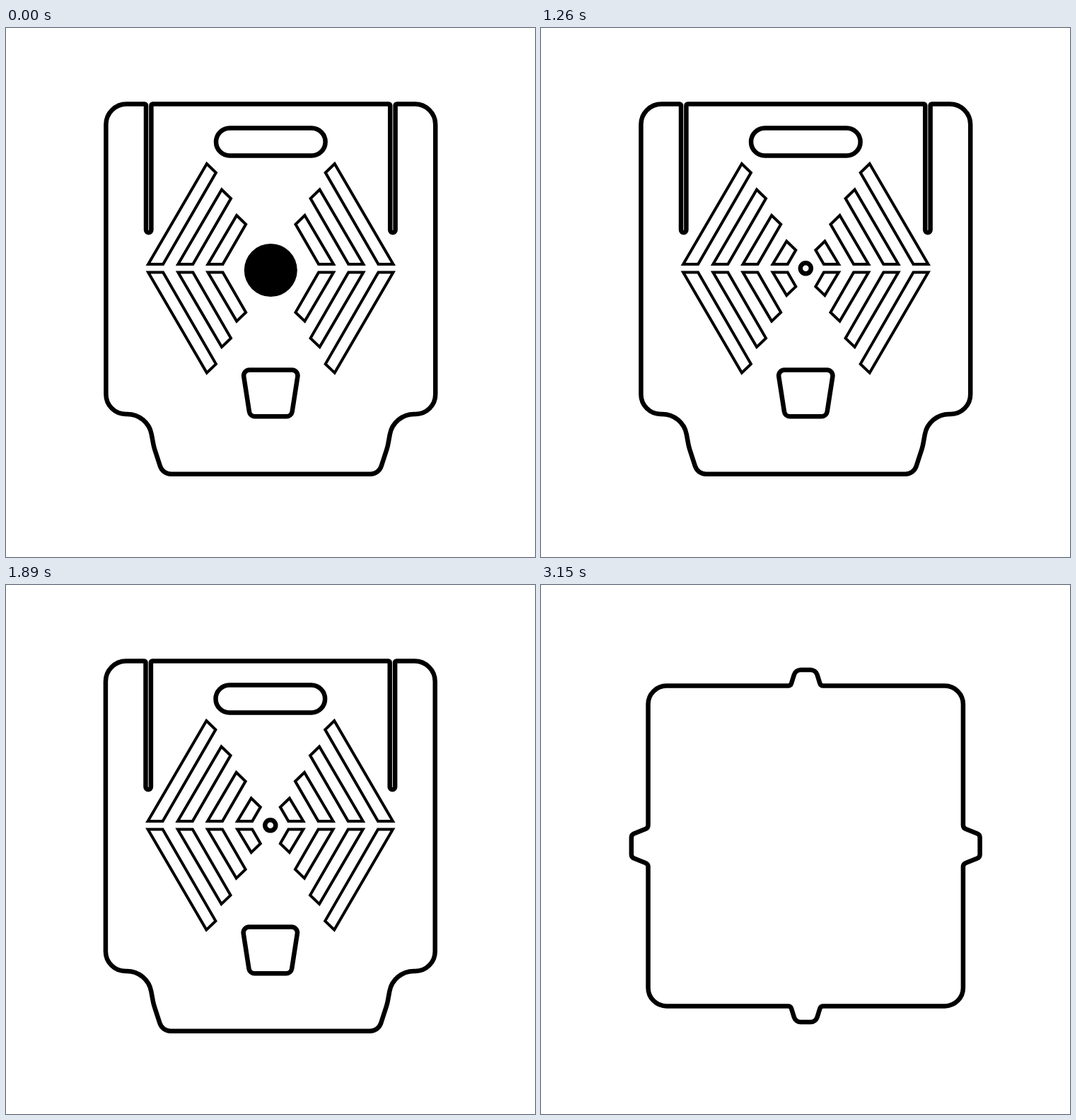
These frames come from a looping animation (748x748 px, 3780 ms). An HTML page with a canvas:

```html
<!DOCTYPE html>
<html lang="en">
<head>
<meta charset="utf-8">
<title>Plates</title>
<style>
  html, body { margin: 0; width: 100%; height: 100%; overflow: hidden; background: #fff; }
  canvas { display: block; width: 748px; height: 748px; }
</style>
</head>
<body>
<canvas id="stage" width="748" height="748"></canvas>
<script>
const ctx = document.getElementById('stage').getContext('2d');
const SIZE = 748;
const STEP = 630;
const BOLD = 6.5;
const FINE = 4;

// Corners are [x, y, radius]; these complete a half or quarter outline.
const reflectX = (corners, cx) =>
  [...corners, ...corners.map(([x, y, r]) => [2 * cx - x, y, r]).reverse()];
const reflectY = (corners, cy) =>
  [...corners, ...corners.map(([x, y, r]) => [x, 2 * cy - y, r]).reverse()];

function outline(corners, width) {
  const [first, last] = [corners[0], corners[corners.length - 1]];
  ctx.lineWidth = width;
  ctx.beginPath();
  ctx.moveTo((first[0] + last[0]) / 2, (first[1] + last[1]) / 2);
  corners.forEach(([x, y, r], i) => {
    const next = corners[(i + 1) % corners.length];
    ctx.arcTo(x, y, next[0], next[1], r);
  });
  ctx.closePath();
  ctx.stroke();
}

function box(x, y, w, h, r, width) {
  ctx.lineWidth = width;
  ctx.beginPath();
  ctx.roundRect(x, y, w, h, r);
  ctx.stroke();
}

function circle(x, y, r) {
  ctx.beginPath();
  ctx.arc(x, y, r, 0, Math.PI * 2);
}

// Repeats a drawing in all four quadrants around a centre.
function inQuadrants(cx, cy, draw) {
  for (const sx of [1, -1]) {
    for (const sy of [1, -1]) {
      ctx.save();
      ctx.translate(cx, cy);
      ctx.scale(sx, sy);
      draw();
      ctx.restore();
    }
  }
}

function emblem(x, y) {
  circle(x, y, 37.5);
  ctx.fill();
}

// A 60° slat; each one further in starts later and is shorter.
function slat(i) {
  const slope = Math.sqrt(3);
  const left = -173.2 + 42.2 * i;
  const base = -5.8;
  const tip = -147.8 + 36.5 * i;
  const shoulder = tip + 12.5;
  const tipX = left + (base - tip) / slope + 0.8;
  ctx.lineWidth = FINE;
  ctx.beginPath();
  ctx.moveTo(tipX, tip);
  ctx.lineTo(tipX + 13, shoulder);
  ctx.lineTo(tipX + 13 - (base - shoulder) / slope, base);
  ctx.lineTo(left, base);
  ctx.closePath();
  ctx.stroke();
}

function firePlate(shift, plain) {
  const cx = 374.3;
  const cy = 339.8;
  ctx.save();
  ctx.translate(shift, 0);
  outline(reflectX([
    [205.4, 107.5, 2], [205.4, 289.2, 3.7], [198, 289.2, 3.7], [198, 107.5, 2],
    [141.4, 107.5, 29], [141.4, 546, 28],
    [200.5, 546, 35], [209, 592, 60], [221.5, 630.7, 16]
  ], cx), BOLD);
  outline(reflectX([[334.8, 483.5, 8], [345, 549.3, 8]], cx), BOLD);
  box(cx - 77.3, 141.5, 154.6, 39, 19.5, BOLD);

  const count = plain ? 4 : 3;
  inQuadrants(cx, cy, () => {
    for (let i = 0; i < count; i++) slat(i);
  });
  if (plain) {
    circle(cx, cy, 7.5);
    ctx.stroke();
  } else {
    emblem(cx, 342.5);
  }
  ctx.restore();
}

function grillPlate() {
  const cx = 374;
  const cy = 369;
  const quarter = [
    [277, 106.7, 5], [268.5, 84.5, 8], [243.5, 84.5, 8], [235.5, 106.7, 5],
    [148, 106.7, 6], [112.5, 136, 5], [112.5, 234, 6], [40.5, 234, 34]
  ];
  outline(reflectX(reflectY(quarter, cy), cx), BOLD);
  for (const side of [-1, 1]) box(cx + side * 286 - 20, 272.5, 40, 193, 7, BOLD);

  inQuadrants(373.8, 372, () => {
    for (let i = 0; i < 8; i++) {
      const length = i === 0 ? 187.5 : 215;
      box(-41 - 27.85 * i, -234, 16.4, length, 8.2, 4.4);
    }
  });
  emblem(cx, 372);
}

function squarePlate() {
  const quarter = [
    [360, 120, 10], [353, 142.6, 5], [151.5, 142.6, 26], [151.5, 343.5, 6], [127.8, 353, 6]
  ];
  outline(reflectX(reflectY(quarter, 369), 374.2), BOLD);
}

function render(now) {
  const step = Math.floor(Math.max(0, now - start) / STEP) % 6;
  ctx.fillStyle = '#fff';
  ctx.fillRect(0, 0, SIZE, SIZE);
  ctx.fillStyle = ctx.strokeStyle = '#000';
  if (step < 4) firePlate(-0.5 * (step % 2), step >= 2);
  else if (step === 4) grillPlate();
  else squarePlate();
  requestAnimationFrame(render);
}

const start = performance.now();
render(start);
</script>
</body>
</html>
```
